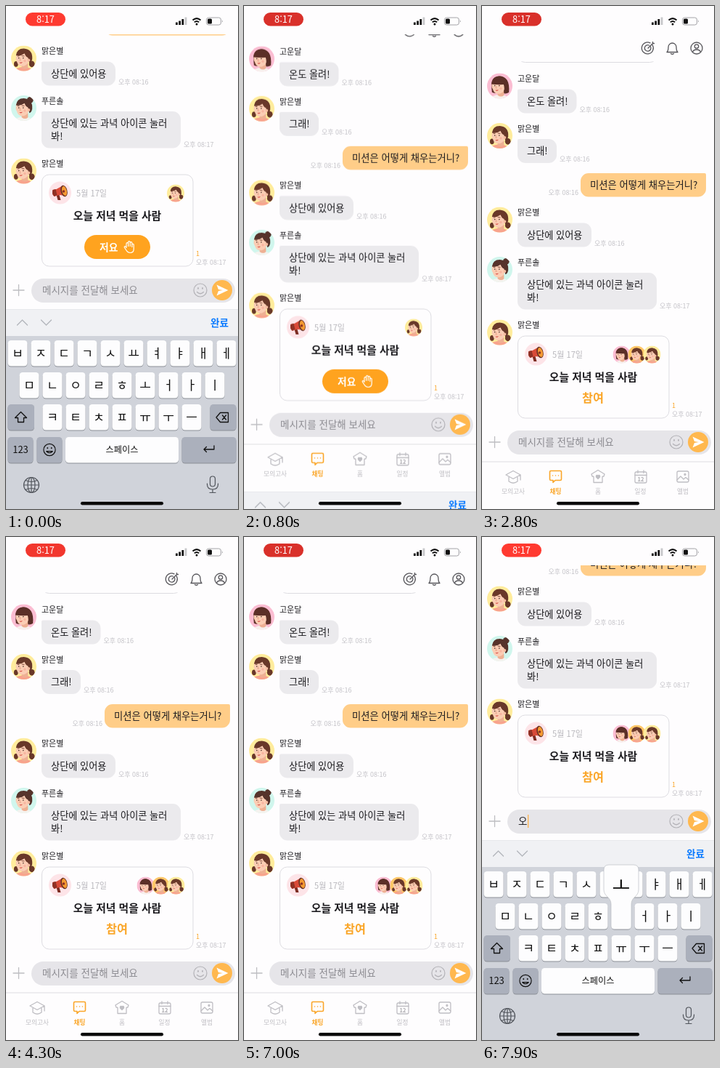
Animation, 320 px wide and 692 px high, one loop 8000 ms. Source, as an HTML page:

```html
<!DOCTYPE html>
<html lang="ko">
<head>
<meta charset="utf-8">
<title>Family chat</title>
<style>
html, body { margin: 0; width: 100%; height: 100%; overflow: hidden; background: #fefdfe; }
svg { display: block; }
#stage { width: 320px; height: 692px; font-family: "Noto Sans CJK KR", "Noto Sans CJK JP", "Noto Sans", sans-serif; }
.line { fill: none; stroke-linecap: round; stroke-linejoin: round; }
:root { --spring: linear(0, .09 6.25%, .264 12.5%, .442 18.75%, .594 25%, .713 31.25%, .801 37.5%, .908 50%, .96 62.5%, .983 75%, .993 87.5%, 1); }

#keyboard { animation: keyboard 8s infinite; }
#app { animation: lift 8s infinite; }
#list { animation: grow 8s step-end infinite; }
.before { animation: before 8s step-end infinite; }
.after { animation: after 8s step-end infinite; }
#pill { animation: pulse 2s -.1s ease-in-out infinite; }
#hint { animation: hint 8s step-end infinite; }
#caret { animation: caret 8s step-end infinite; }
#first { animation: first 8s step-end infinite; }
#second { animation: second 8s step-end infinite; }
#popFirst { animation: popFirst 8s step-end infinite; }
#popSecond { animation: popSecond 8s step-end infinite; }

@keyframes keyboard {
  0% { transform: translateY(0); }
  6.52% { transform: translateY(0); animation-timing-function: var(--spring); }
  12%, 89.14% { transform: translateY(276px); animation-timing-function: var(--spring); }
  94.64%, 100% { transform: translateY(0); }
}
@keyframes lift {
  0% { transform: translateY(-209px); }
  6.74% { transform: translateY(-209px); animation-timing-function: var(--spring); }
  12.21%, 90.14% { transform: translateY(0); animation-timing-function: var(--spring); }
  95.61%, 100% { transform: translateY(-209px); }
}
@keyframes grow { 0% { transform: translateY(-13px); } 27.5%, 100% { transform: translateY(0); } }
@keyframes before { 0% { opacity: 1; } 27.5%, 100% { opacity: 0; } }
@keyframes after { 0% { opacity: 0; } 27.5%, 100% { opacity: 1; } }
@keyframes pulse { 0%, 100% { fill: #ff3a30; } 50% { fill: #d8302a; } }
@keyframes hint { 0% { opacity: 1; } 96.25%, 100% { opacity: 0; } }
@keyframes caret {
  0% { opacity: 0; transform: translateX(0); }
  91.25% { opacity: 1; transform: translateX(0); }
  96.25%, 100% { opacity: 1; transform: translateX(13px); }
}
@keyframes first { 0% { opacity: 0; } 96.25% { opacity: 1; } 98.2%, 100% { opacity: 0; } }
@keyframes second { 0% { opacity: 0; } 98.2%, 100% { opacity: 1; } }
@keyframes popFirst { 0% { opacity: 0; } 95.8% { opacity: 1; } 97.4%, 100% { opacity: 0; } }
@keyframes popSecond { 0% { opacity: 0; } 98.1%, 100% { opacity: 1; } }
</style>
</head>
<body>
<svg id="stage" viewBox="0 0 320 692">
  <defs>
    <clipPath id="round"><circle cx="18" cy="18" r="18"/></clipPath>
    <g id="face">
      <path d="M15 25h9v6q-4 4-9 0z" fill="#eeb093"/>
      <path d="M7 15q0-7 9-7 10 0 10 10-1 9-8 11-8 1-10-7-2-2-1-7z" fill="#fbcdb4"/>
      <path class="line" d="M9.500 15l2-.5M15.500 14.500l3 .3" stroke="#6b3a2c" stroke-width=".9"/>
      <circle cx="11" cy="17.600" r=".8" fill="#3c221d"/><circle cx="17.300" cy="17.600" r=".8" fill="#3c221d"/>
      <path class="line" d="M13.200 18l-1 3h1.500" stroke="#e29c82" stroke-width=".8"/>
      <path d="M11.500 24q2.500 2.500 5-.5z" fill="#d9534a"/>
      <circle cx="19.500" cy="21.500" r="1.800" fill="#f5a493" opacity=".6"/>
    </g>
    <g id="fringe">
      <path d="M7 14Q8 4 18 4q13 1 12 15-1 5-4 6-1-4-2-8-3-1-5-6-5 4-12 3z"/>
      <circle cx="25" cy="20.500" r="2" fill="#f6bda2"/>
    </g>
    <g id="pigtails" fill="#693829">
      <path d="M3 38q2-7 14-8 12 0 15 8z" fill="#f8a38d"/>
      <ellipse cx="7" cy="26" rx="3" ry="4"/>
      <ellipse cx="29.500" cy="26" rx="4" ry="4.500"/>
      <use href="#face"/><use href="#fringe"/>
    </g>
    <g id="bun" fill="#56332b">
      <path d="M4 38q2-7 13-8 12 0 15 8z" fill="#f5f3ef"/>
      <circle cx="27" cy="6.500" r="4.500"/>
      <use href="#face"/><use href="#fringe"/>
    </g>
    <g id="bob" fill="#5b2f27">
      <path d="M4 38q2-7 13-8 12 0 15 8z" fill="#f7f0ed"/>
      <path d="M7 27Q4 5 17 4q16 0 14 23-4 3-9 1H10z"/>
      <use href="#face"/>
      <path d="M6 15.500Q7 4 18 4q13 1 12 23h-6q1-7-.5-11-8 .5-17.500-.5z"/>
    </g>
    <g id="smile" class="line">
      <circle r="9"/><path d="M-4.500 2.500q4.500 4.500 9 0"/><path d="M-3-3v.8M3-3v.8" stroke-width="1.800"/>
    </g>
    <g id="hand" class="line" stroke="#fff" stroke-width="1.200">
      <path d="M-4 1v-5.500a1.300 1.300 0 0 1 2.600 0V-1v-5.500a1.300 1.300 0 0 1 2.600 0V-1v-4.500a1.300 1.300 0 0 1 2.600 0V0v-3a1.200 1.200 0 0 1 2.400 0v6q0 5-5 5-3 0-5-3l-3-4.500q0-2 1.800-1z"/>
    </g>
    <g id="megaphone">
      <circle r="15.500" fill="#fde4e8"/>
      <path d="M-5 3l4 0 2 7h-4z" fill="#7c2c22"/>
      <path d="M-10-4l5-1L4-10l5 14-10-1-7 2q-4-4-2-9z" fill="#d94a38"/>
      <path d="M-10-4l4-1 2 8-4 2q-4-4-2-9z" fill="#8f3125"/>
      <ellipse cx="5.500" cy="-2.500" rx="4.500" ry="8" transform="rotate(-14 5.500 -2.500)" fill="#653024"/>
      <ellipse cx="6" cy="-2.500" rx="3.300" ry="6.600" transform="rotate(-14 6 -2.500)" fill="#f59a32"/>
      <circle cx="5" cy="-2" r="1.800" fill="#8f3125"/>
    </g>
    <path id="balloon" d="M-17 451h34q7 0 7 7v27c0 10-10 10-10 20v30q0 4.500-4.500 4.500h-19q-4.500 0-4.500-4.500v-30c0-10-10-10-10-20v-27q0-7 7-7z" fill="#fdfdfe" stroke="#b4b7bd" stroke-width=".6"/>
  </defs>

  <g id="app">
    <g id="list"></g>
    <g id="stamp"></g>
    <rect y="-40" width="320" height="116" fill="#fefdfe"/>
    <g class="line" stroke="#555459" stroke-width="1.300">
      <path d="M235 53.500a8 8 0 1 1-3-2.700M232.500 56a4.300 4.300 0 1 1-2-2M229 58l6.500-6.500v-2M235.500 51.500h2"/>
      <path d="M255 63.500q2-2 2-7a5.500 5.500 0 0 1 11 0q0 5 2 7zM260.500 65.500q2 1.500 4 0"/>
      <circle cx="296" cy="58" r="8"/><circle cx="296" cy="55.500" r="2.700"/><path d="M290.500 63.500q1-3.500 5.500-3.500t5.500 3.500"/>
    </g>
    <rect y="574" width="320" height="126" fill="#fefdfe"/>
    <path class="line" d="M10 600h15M17.500 592.500v15" stroke="#bdbdc1" stroke-width="1.300"/>
    <rect x="35" y="584" width="281" height="33" rx="16.500" fill="#e6e5e9"/>
    <use href="#smile" x="268" y="600" stroke="#b3b2b7" stroke-width="1.200"/>
    <circle cx="298" cy="600" r="14" fill="#ffb84f"/>
    <path d="M290.500 592.500l16 7.500-16 7.500 2.500-6.500 6-1-6-1z" fill="#fff"/>
    <g id="field"></g>
    <rect id="caret" x="50" y="591" width="1.300" height="18" fill="#ffb14a"/>
    <path d="M0 627h320" stroke="#dedde1"/>
    <g class="line" stroke="#bfbec3" stroke-width="1.300">
      <path d="M33 645l10-5.500 10 5.500-10 5.500zM37 648v6q6 4.500 12 0v-6M53 645v7"/>
      <path d="M152 647l-1-3 9-5.500 9 5.500-1 3-2 .5v8h-12v-8z"/><path d="M160 650.500l-2.500-2.500q-.5-2.500 1.500-2.500l1 1 1-1q2 0 1.500 2.500z" fill="#bfbec3"/>
      <rect x="211" y="641" width="16" height="15" rx="2"/><path d="M211 645.500h16M215 639v3.500M223 639v3.500"/>
      <rect x="269" y="640" width="16" height="15" rx="2"/><path d="M269 652l5-5 4 4 3-2.500 4 3.500"/><circle cx="280" cy="644.500" r="1"/>
      <path d="M95 639.500h13q1.500 0 1.500 1.500v10q0 1.500-1.500 1.500h-7l-3 3v-3h-3q-1.500 0-1.500-1.500v-10q0-1.500 1.500-1.500zM97.500 646h.01M101.500 646h.01M105.500 646h.01" stroke="#faa629" stroke-width="1.600"/>
    </g>
    <g id="tabs"></g>
  </g>

  <g id="keyboard">
    <rect y="417" width="320" height="276" fill="#d0d3da"/>
    <rect y="417" width="320" height="37" fill="#f0f1f4"/>
    <path d="M0 417.300h320" stroke="#dcdde1" stroke-width=".6"/>
    <path class="line" d="M15.500 439l7-7 7 7M48.500 432l7 7 7-7" stroke="#b4b7bd" stroke-width="1.400"/>
    <g id="keys"></g>
    <g class="line" stroke="#111" stroke-width="1.300">
      <path d="M20.500 558.500l-8 8h4v6h8v-6h4z"/>
      <path d="M290 566l5.500-6.500h11v13h-11zM298.500 563l5 6M303.500 563l-5 6"/>
      <path d="M287 605v5h-14M276.500 606.500l-3.500 3.500 3.500 3.500"/>
      <use href="#smile" transform="translate(60 610.500) scale(.9)"/><path d="M56 612.700h8"/>
    </g>
    <g class="line" stroke="#51555c" stroke-width="1.200">
      <circle cx="35" cy="659" r="10.500"/><ellipse cx="35" cy="659" rx="5" ry="10.500"/><path d="M24.500 659h21M35 648.500v21M27 652.500q8 4 16 0M27 665.500q8-4 16 0"/>
      <rect x="281.500" y="647" width="7" height="14" rx="3.500"/><path d="M277.500 657v1q0 7 7.500 7t7.500-7v-1M285 665v4M281 669.500h8"/>
    </g>
    <g id="popFirst"></g>
    <g id="popSecond"></g>
  </g>

  <rect width="320" height="39" fill="#fefdfe"/>
  <rect id="pill" x="27" y="9" width="55" height="18.500" rx="9.250"/>
  <g id="clock"></g>
  <path d="M234 22.500h2.800v3.500H234zM238.200 20.500h2.800v5.500h-2.800zM242.400 18h2.800v8h-2.800z" fill="#111"/>
  <path d="M246.600 15.500h2.800v10.500h-2.800z" fill="#c8c8cb"/>
  <g class="line" stroke="#111" stroke-width="2"><path d="M257.500 19.500q5.500-4.800 11 0M259.800 22.300q3.200-2.600 6.400 0" stroke-linecap="butt"/></g>
  <circle cx="263" cy="25" r="1.500" fill="#111"/>
  <rect x="276.500" y="16" width="20" height="10" rx="3" fill="none" stroke="#a3a3a7"/>
  <rect x="278" y="17.500" width="6" height="7" rx="1.500" fill="#111"/>
  <path d="M298 19.500q2 1.500 0 3z" fill="#a3a3a7"/>
  <rect x="103" y="682" width="114" height="4.500" rx="2.250" fill="#080808"/>
</svg>

<script>
const $ = id => document.getElementById(id);
const text = (x, y, s, size, fill = '#1c1b1f', more = '') =>
  `<text x="${x}" y="${y}" dy=".37em" font-size="${size}" fill="${fill}" ${more}>${s}</text>`;
const MID = 'text-anchor="middle" ', BOLD = 'font-weight="600" ', MEDIUM = 'font-weight="500" ';
const ORANGE = '#faa629', GREY = '#abb0bc';

const avatar = (x, y, r, look, color) =>
  `<g transform="translate(${x - r} ${y - r}) scale(${r / 18})" clip-path="url(#round)">
   <rect width="36" height="36" fill="${color}"/><use href="#${look}"/></g>`;

const time = (x, y, s) => text(x, y, '오후 ' + s, 9, '#c3c2c7');

// Speech bubble with one squared top corner
const bubble = (x, y, w, h, fill, mine) => {
  const r = 11, left = mine ? r : 2, right = mine ? 2 : r;
  const arc = (n, dx, dy) => `a${n} ${n} 0 0 1 ${dx * n} ${dy * n}`;
  return `<path fill="${fill}" d="M${x + left} ${y}H${x + w - right}${arc(right, 1, 1)}V${y + h - r}${arc(r, -1, 1)}
    H${x + r}${arc(r, -1, -1)}V${y + left}${arc(left, 1, -1)}z"/>`;
};

const people = {
  a: ['맑은별', 'pigtails', '#ffec9c'],
  b: ['푸른솔', 'bun', '#d0f6ed'],
  c: ['고운달', 'bob', '#fbbdd2']
};
const sender = (who, y) => {
  const [name, look, color] = people[who];
  return avatar(24.5, y + 10, 17.5, look, color) + text(49, y, name, 11);
};
const message = (who, y, w, lines, stamp) => {
  const h = lines.length > 1 ? 50.5 : 33, top = y + 14.5;
  return sender(who, y) + bubble(49, top, w, h, '#ebeaed') +
    lines.map((s, i) => text(62, top + 16.5 + i * 18, s, 13.2)).join('') +
    time(53 + w, top + h - 5, stamp);
};

const cardBox = h => `<rect x="49.500" y="454" width="208.500" height="${h}" rx="10" fill="#fefdfe" stroke="#dddce1"/>`;
const small = (x, look, color) => avatar(x, 479.5, 12, look, color);

$('list').innerHTML =
  '<rect x="49.500" y="10" width="192" height="67.500" rx="10" fill="none" stroke="#dddce1"/>' +
  message('c', 100, 81.5, ['온도 올려!'], '08:16') +
  message('a', 168.5, 54, ['그래!'], '08:16') +
  time(91.5, 257, '08:16') +
  bubble(136, 230, 173, 32.5, '#ffcd88', true) +
  text(149, 246, '미션은 어떻게 채우는거니?', 13.3) +
  message('a', 284, 102, ['상단에 있어용'], '08:16') +
  message('b', 352.5, 192, ['상단에 있는 과녁 아이콘 눌러', '봐!'], '08:17') +
  sender('a', 439) +
  `<g class="before">${cardBox(126)}${small(234, 'pigtails', '#ffec9c')}
    <rect x="108" y="537" width="91" height="33" rx="16.500" fill="#ffa31f"/>
    ${text(129, 553.5, '저요', 13.8, '#fff', BOLD)}<use href="#hand" x="170" y="553.500"/></g>
  <g class="after">${cardBox(113)}${small(192.5, 'bob', '#fbbdd2')}${small(213.5, 'pigtails', '#ffc768')}
    ${small(234.5, 'pigtails', '#ffec9c')}${text(153, 538.5, '참여', 16.3, ORANGE, MID + BOLD)}</g>
  <use href="#megaphone" x="74.500" y="479"/>` +
  text(97, 479.5, '5월 17일', 11.1, '#b9b8bd') +
  text(153.5, 511, '오늘 저녁 먹을 사람', 14.8, '#1c1b1f', MID + BOLD);

$('stamp').innerHTML = text(262, 550, '1', 9, ORANGE) + time(262, 562, '08:17');

$('field').innerHTML =
  `<g id="hint">${text(50, 600, '메시지를 전달해 보세요', 13.5, '#8d8c92')}</g>
   <g id="first">${text(50, 600, 'ㅇ', 13.5)}</g><g id="second">${text(50, 600, '오', 13.5)}</g>`;

$('tabs').innerHTML = ['모의고사', '채팅', '홈', '일정', '앨범'].map((s, i) =>
  text(43 + i * 58.5, 668, s, 8.7, i === 1 ? ORANGE : '#bfbec3', MID + (i === 1 ? BOLD : ''))).join('') +
  text(219, 651, '12', 7.5, '#aaa9ae', MID + BOLD);

const key = (x, y, w, label = '', size = 17, fill = '#fdfdfe') =>
  `<rect x="${x}" y="${y + 1}" width="${w}" height="35.500" rx="4.500" fill="#8c9097"/>
   <rect x="${x}" y="${y}" width="${w}" height="35.500" rx="4.500" fill="${fill}"/>` +
  text(x + w / 2, y + 17.5, label, size, '#111', MID);
const row = (letters, x, y) => [...letters].map((c, i) => key(x + i * 32 - 13.5, y, 27, c)).join('');

$('keys').innerHTML = text(282, 435.5, '완료', 13.6, '#0a7aff', BOLD) +
  row('ㅂㅈㄷㄱㅅㅛㅕㅑㅐㅔ', 16, 460) + row('ㅁㄴㅇㄹㅎㅗㅓㅏㅣ', 32, 504) + row('ㅋㅌㅊㅍㅠㅜㅡ', 64, 548) +
  key(2.5, 548, 36.5, '', 0, GREY) + key(281.5, 548, 36, '', 0, GREY) +
  key(2.5, 593, 35, '123', 13, GREY) + key(42.5, 593, 35, '', 0, GREY) +
  key(82, 593, 156, '스페이스', 12.2) + key(242.5, 593, 75, '', 0, GREY);

const popup = (x, c) => `<use href="#balloon" x="${x}"/>` + text(x, 479, c, 27, '#111', MID);
$('popFirst').innerHTML = popup(96, 'ㅇ');
$('popSecond').innerHTML = popup(192, 'ㅗ');

$('clock').innerHTML = text(54.5, 18.2, '8:17', 12.8, '#fff', MID + MEDIUM);
</script>
</body>
</html>
```
